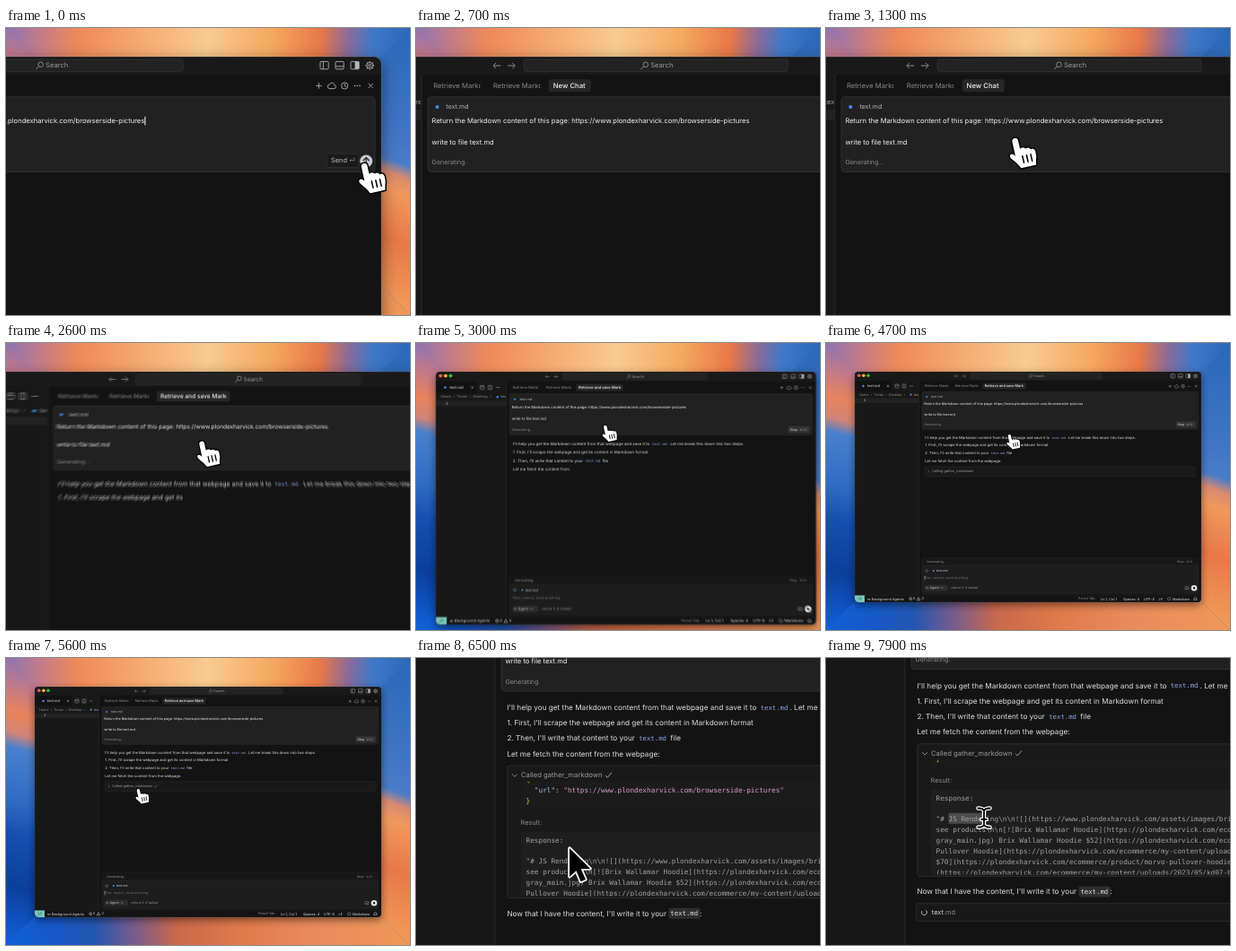
An HTML page with a canvas that plays this animation: 450x320 px, repeating every 8 s.

```html
<!DOCTYPE html>
<html lang="en">
<head>
<meta charset="utf-8">
<title>Chat panel demo</title>
<style>
html, body { margin: 0; width: 100%; height: 100%; overflow: hidden; background: #111; }
canvas { display: block; width: 450px; height: 320px; }
</style>
</head>
<body>
<canvas id="stage"></canvas>
<script>
const W = 450, H = 320, LOOP = 8000;
const cv = document.getElementById('stage');
const dpr = window.devicePixelRatio || 1;
cv.width = W * dpr;
cv.height = H * dpr;
const c = cv.getContext('2d');

const SANS = 'Inter, "DejaVu Sans", sans-serif';
const MONO = '"DejaVu Sans Mono", monospace';
const HOST = 'plondexharvick.com';
const PAGE = 'https://www.' + HOST + '/browserside-pictures';
const SHOP = 'https://' + HOST + '/ecommerce/';

const clamp = v => Math.max(0, Math.min(1, v));
const ease = (t, a, b) => { const p = clamp((t - a) / (b - a)); return p * p * (3 - 2 * p); };
const spring = (t, start, k) => {
  const u = Math.max(0, (t - start) / 1000 * k);
  return 1 - (1 + u) * Math.exp(-u);
};

// Text is set at 40px and scaled down, so advances stay fractional.
function text(str, x, y, size, color, opt = {}) {
  c.save();
  c.font = `${opt.weight || 400} 40px ${opt.mono ? MONO : SANS}`;
  c.textRendering = 'geometricPrecision';
  c.fillStyle = color;
  c.translate(x, y + size * 0.34);
  c.scale(size / 40, size / 40);
  c.fillText(str, 0, 0);
  const w = c.measureText(str).width * size / 40;
  c.restore();
  return w;
}
function box(x, y, w, h, r, fill, stroke, lw = 0.5) {
  c.beginPath();
  c.roundRect(x, y, w, h, r);
  if (fill) { c.fillStyle = fill; c.fill(); }
  if (stroke) { c.strokeStyle = stroke; c.lineWidth = lw; c.stroke(); }
}
function dot(x, y, r, fill) {
  c.beginPath();
  c.arc(x, y, r, 0, 7);
  c.fillStyle = fill;
  c.fill();
}
function ring(x, y, r, color, lw = 0.5, a = 0, b = 7) {
  c.beginPath();
  c.arc(x, y, r, a, b);
  c.strokeStyle = color;
  c.lineWidth = lw;
  c.stroke();
}
function line(pts, color, lw = 0.5) {
  c.beginPath();
  for (let i = 0; i < pts.length; i += 2) c.lineTo(pts[i], pts[i + 1]);
  c.strokeStyle = color;
  c.lineWidth = lw;
  c.stroke();
}
function clipTo(x, y, w, h, draw) {
  c.save();
  c.beginPath();
  c.rect(x, y, w, h);
  c.clip();
  draw();
  c.restore();
}

function camera(t) {
  if (t >= 5600) {
    const b = spring(t, 5600, 11);
    return { s: 1 + b, x: -119 * b, y: -155.5 * b };
  }
  if (t >= 2450) {
    const s = 2 - spring(t, 2450, 7.13);
    return { s, x: -197 * (1 - spring(t, 2450, 8)), y: 32 * (1 - s) };
  }
  return { s: 2, x: -418 + 221 * spring(t, 100, 10), y: -32 };
}

function side(pts, grad, stops) {
  const g = c.createLinearGradient(...grad);
  for (const [p, col] of stops) g.addColorStop(p, col);
  c.beginPath();
  for (let i = 0; i < pts.length; i += 2) c.lineTo(pts[i], pts[i + 1]);
  c.fillStyle = g;
  c.fill();
}
// The backdrop stays still while the window zooms over it.
function wallpaper() {
  c.save();
  c.setTransform(dpr, 0, 0, dpr, 0, 0);
  c.fillStyle = '#3f70b8';
  c.fillRect(0, 0, W, H);
  side([0, 0, 450, 0, 450, 45, 0, 45], [0, 0, 448, 30],
    [[0, '#8a74b4'], [0.08, '#c07a8c'], [0.18, '#ee8a58'], [0.35, '#f6ad72'], [0.5, '#f8cb90'],
     [0.66, '#f5a860'], [0.78, '#e87848'], [0.85, '#8a6a9a'], [0.91, '#3f78c8'], [1, '#2a68b8']]);
  side([0, 0, 36, 36, 36, 320, 0, 320], [20, 0, -60, 300],
    [[0, '#8a74b4'], [0.1, '#c0788c'], [0.2, '#e8845c'], [0.27, '#d08478'], [0.32, '#4a80cc'],
     [0.5, '#2f6cc4'], [0.62, '#1550b0'], [0.8, '#0c3f9c'], [1, '#1060d8']]);
  side([450, 0, 410, 40, 410, 280, 450, 320], [440, 0, 340, 270],
    [[0, '#2a68b8'], [0.35, '#3f74c4'], [0.49, '#4a7cc8'], [0.54, '#d88a70'], [0.6, '#f0985c'],
     [0.78, '#e87848'], [1.0, '#f09858']]);
  side([0, 320, 36, 284, 410, 280, 450, 320], [0, 320, 450, 300],
    [[0, '#1060d8'], [0.12, '#1558c8'], [0.22, '#2456b0'], [0.32, '#7a5c8c'], [0.42, '#c8684c'],
     [0.58, '#e07a4a'], [0.75, '#e88a5c'], [1, '#f09858']]);
  c.restore();
}

const caretOn = t => Math.floor(t / 530) % 2 === 0;
const generating = t => 'Generating' + '.'.repeat([3, 1, 2][Math.floor(t % 1200 / 400)]);

function titleBar() {
  c.fillStyle = '#191919';
  c.fillRect(32, 32, 386, 10);
  ['#ff5f57', '#febc2e', '#28c840'].forEach((col, i) => dot(36.8 + i * 5.1, 36.2, 1.8, col));
  const g = '#8a8a8a', icon = '#a0a0a0';
  line([147.6, 37, 143.4, 37], g);
  line([145, 35.4, 143.4, 37, 145, 38.6], g);
  line([151.4, 37, 155.6, 37], g);
  line([154, 35.4, 155.6, 37, 154, 38.6], g);
  box(160.5, 33.6, 147, 6.7, 1.4, '#222', '#333', 0.4);
  ring(228.3, 36.4, 1.4, g);
  line([227.3, 37.4, 225.6, 39], g);
  text('Search', 231, 36.9, 3.8, '#9a9a9a');
  for (let i = 0; i < 3; i++) {
    const x = 384 + i * 8.5;
    box(x, 34.7, 4.6, 4.2, 0.5, null, icon);
    c.fillStyle = '#b5b5b5';
    if (i === 0) line([x + 1.7, 34.7, x + 1.7, 38.9], icon);
    if (i === 1) line([x, 37.4, x + 4.6, 37.4], icon);
    if (i === 2) c.fillRect(x + 2.3, 34.7, 2.3, 4.2);
  }
  ring(411.6, 36.9, 1.7, icon);
  ring(411.6, 36.9, 0.7, icon);
  for (let a = 0; a < 6.2; a += Math.PI / 4) {
    const dx = Math.cos(a), dy = Math.sin(a);
    line([411.6 + dx * 1.7, 36.9 + dy * 1.7, 411.6 + dx * 2.4, 36.9 + dy * 2.4], icon, 0.7);
  }
}

function sidebar() {
  c.fillStyle = '#181818';
  c.fillRect(32, 42, 71.5, 239);
  c.fillStyle = '#121212';
  c.fillRect(32, 42, 41, 11.5);
  dot(41.5, 48, 1.2, '#4c8df0');
  text('text.md', 46, 48, 3.9, '#e8e8e8');
  line([67.8, 46.8, 70.2, 49.2], '#bbb');
  line([70.2, 46.8, 67.8, 49.2], '#bbb');
  box(77, 46, 4, 4, 0.5, null, '#999');
  line([77, 47.4, 81, 47.4], '#999');
  box(85, 46, 4, 4, 0.5, null, '#999');
  line([87, 46, 87, 50], '#999');
  line([93, 48, 97, 48], '#999');
  clipTo(32, 53, 71, 10, () => {
    text('Users  ›  Tovan  ›  Desktop  ›', 37, 57.4, 3.8, '#888');
    dot(94.6, 57.6, 1.1, '#4c8df0');
    text('text.md', 97.8, 57.4, 3.8, '#999');
  });
  c.fillStyle = '#222';
  c.fillRect(32, 61.4, 71.5, 5.6);
  text('1', 42, 64.2, 3.8, '#ccc', { mono: 1 });
  c.fillStyle = '#2a2a2a';
  c.fillRect(103.2, 42, 0.5, 239);
}

function tabs(t) {
  [110, 143.4].forEach(x => clipTo(x, 43, 26.2, 10, () =>
    text('Retrieve Markdown', x, 48, 3.85, '#8a8a8a')));
  const named = t > 2100;
  box(174.3, 44.6, named ? 48 : 23.6, 7, 1.2, '#262626');
  clipTo(174, 43, named ? 46 : 24, 10, () =>
    text(named ? 'Retrieve and save Markdown' : 'New Chat', 176.8, 48, 3.85, '#f2f2f2', { weight: 500 }));
  const g = '#a0a0a0';
  line([381.6, 48.2, 384.8, 48.2], g);
  line([383.2, 46.6, 383.2, 49.8], g);
  c.beginPath();
  c.arc(389.4, 48.6, 1.2, 1.57, 4.7);
  c.arc(390.6, 47.7, 1.2, 3.6, 6);
  c.arc(391.7, 48.8, 1, 4.7, 7.85);
  c.closePath();
  c.strokeStyle = g;
  c.lineWidth = 0.5;
  c.stroke();
  ring(397.6, 48.2, 1.8, g);
  line([397.6, 47, 397.6, 48.3, 398.6, 48.8], g);
  for (let i = -1; i < 2; i++) dot(404.6 + i * 1.4, 48.2, 0.4, g);
  line([410.8, 46.9, 413.4, 49.5], g);
  line([413.4, 46.9, 410.8, 49.5], g);
}

function message(t) {
  box(107, 54.4, 307.5, 41.8, 2, '#212121', '#303030');
  dot(112.2, 60, 1, '#4c8df0');
  text('text.md', 117.2, 60, 3.5, '#b8b8b8');
  const w = text('Return the Markdown content of this page: ' + PAGE, 109.2, 67.8, 3.8, '#f0f0f0');
  text('write to file text.md', 109.2, 79.6, 3.8, '#f0f0f0');
  if (t < 300) {
    if (caretOn(t)) line([109.5 + w, 65.4, 109.5 + w, 70.2], '#fff', 0.5);
    box(387.5, 86, 18, 7.8, 1.4, '#1a1a1a', '#333', 0.4);
    text('Send', 390, 89.8, 3.7, '#bbb');
    text('⏎', 400, 89.8, 3.6, '#888');
    dot(409.6, 90.2, 3.5, '#c9cad6');
    line([409.6, 92, 409.6, 88.4], '#222', 0.6);
    line([407.9, 90, 409.6, 88.2, 411.3, 90], '#222', 0.6);
  } else {
    text(generating(t), 109.2, 90.8, 3.55, '#8a8a8a');
    box(389.5, 87.2, 22.5, 7, 1.2, '#333');
    text('Stop', 391.5, 90.8, 3.5, '#ddd');
    text('⌘⌫', 401.3, 90.8, 3.3, '#888');
  }
}

const LINES = [
  "I'll help you get the Markdown content from that webpage and save it to `text.md`. Let me break this down into two steps:",
  "1. First, I'll scrape the webpage and get its content in Markdown format",
  "2. Then, I'll write that content to your `text.md` file",
  'Let me fetch the content from the webpage:'
];
function rich(str, x, y, limit, chip) {
  str.split('`').forEach((part, i) => {
    const s = part.slice(0, Math.max(0, limit));
    limit -= part.length;
    if (!s) return;
    if (i % 2) {
      if (chip) box(x, y - 3, 17.6, 6, 1, '#2e2e2e');
      x += 1 + text(s, x + 1, y, 3.65, chip ? '#e2e2e2' : '#8fa2ea', { mono: 1 }) + 1;
    } else {
      x += text(s, x, y, 4.1, '#dedede');
    }
  });
}
function reply(t) {
  let left = Math.floor((t - 1995) * 0.272);
  LINES.forEach((s, i) => {
    rich(s, 110.2, 105.3 + i * 8.62, left);
    left -= s.replace(/`/g, '').length;
  });
}

const CODE = [
  '"# JS Rendering\\n\\n![](https://www.' + HOST + '/assets/images/brix.svg)Menu of items to',
  'see products\\n\\n[![Brix Wallamar Hoodie](' + SHOP + 'my-content/uploads/kd01-',
  'gray_main.jpg) Brix Wallamar Hoodie $52](' + SHOP + 'product/brix-hoodie) [![Morvo',
  'Pullover Hoodie](' + SHOP + 'my-content/uploads/kd02-black_main.jpg) Morvo Hoodie',
  '$70](' + SHOP + 'product/morvo-pullover-hoodie) [![Hoodie]',
  '(' + SHOP + 'my-content/uploads/2023/05/kd07-black_main.jpg) Hoodie',
  '$69](' + SHOP + 'product/wool-hoodie) [![Light Hoodie]',
  '(' + SHOP + 'my-content/uploads/kd09-green_main.jpg) Hoodie'
];
function toolOutput(t) {
  const off = 18 - 18 * ease(t, 6150, 6480) - 11.4 * ease(t, 6800, 7420);
  const mono = { mono: 1 }, size = 3.85, x = 120.8;
  c.translate(0, off);
  text('Parameters:', 117.8, 135.2, 3.7, '#8c8c8c');
  box(117.8, 140.5, 291, 21.5, 1, '#1b1b1b');
  text('{', x, 145.3, size, '#e8c84a', mono);
  let w = text('  "url"', x, 151.3, size, '#9cc3ee', mono);
  w += text(': ', x + w, 151.3, size, '#ccc', mono);
  text('"' + PAGE + '"', x + w, 151.3, size, '#dc9ad2', mono);
  text('}', x, 157.3, size, '#e8c84a', mono);
  text('Result:', 117.8, 169.3, 3.7, '#8c8c8c');
  box(117.8, 174.6, 291, 80, 1, '#1e1e1e');
  text('Response:', x, 179.3, size, '#a2a2a2', mono);
  if (t > 7450) {
    const from = x + 3 * 2.318;
    c.fillStyle = '#4b4b4b';
    c.fillRect(from, 187.7, Math.max(0, pointer(t).x - from), 6);
  }
  CODE.forEach((s, i) => text(s, x, 190.8 + i * 6, size, '#a2a2a2', mono));
}
function tool(t) {
  if (t < 3200) return;
  const open = spring(t, 5700, 14), h = 11 + 62.8 * open;
  box(110.4, 137.8, 301.6, h, 1.4, '#191919', '#2c2c2c');
  const done = t > 5000;
  c.save();
  c.translate(114.5, 143.2);
  c.rotate(open * Math.PI / 2);
  line([-0.7, -1.4, 0.7, 0, -0.7, 1.4], '#8a8a8a');
  c.restore();
  const w = text((done ? 'Called' : 'Calling') + ' gather_markdown', 118, 143, 3.85, '#9c9c9c');
  if (done) line([119.8 + w, 143.2, 120.9 + w, 144.4, 123.2 + w, 141.6], '#9c9c9c');
  if (t > 5700) clipTo(111, 146.6, 300, h - 9.8, () => toolOutput(t));
  if (t > 6050) rich("Now that I have the content, I'll write it to your `text.md`:", 110.2, 220.2, 999, true);
  if (t > 6800) {
    box(109.8, 226.8, 302, 9.8, 1.2, '#181818', '#2c2c2c');
    const a = t / 160;
    ring(114.2, 231.7, 1.5, '#b5b5b5', 0.5, a, a + 4.6);
    const n = text('text', 118.4, 231.7, 3.7, '#d8d8d8');
    text('.md', 118.4 + n, 231.7, 3.7, '#8c8c8c');
  }
}

function composer(t) {
  c.fillStyle = '#131313';
  c.fillRect(104, 238.6, 314, 43);
  box(107, 239.6, 307.5, 39.6, 1.6, '#171717', '#2b2b2b', 0.4);
  text(generating(t), 112.2, 244, 3.55, '#9a9a9a');
  text('Stop', 391, 244, 3.5, '#888');
  text('⌘⌫', 401, 244, 3.3, '#666');
  box(107, 248, 307.5, 31.2, 1.6, '#1d1d1d', '#2e2e2e', 0.4);
  ring(112.2, 254, 1.4, '#888');
  dot(119.8, 254, 1, '#4c8df0');
  text('text.md', 122.8, 254, 3.6, '#d0d0d0');
  text('Plan, search, build anything', 110, 262, 3.7, '#6c6c6c');
  if (t > 3000 && caretOn(t)) line([110, 259.6, 110, 264.4], '#ddd', 0.5);
  box(109.6, 269.8, 26.4, 6.8, 3, '#2c2c2c');
  text('∞', 111, 273, 3.6, '#aaa');
  text('Agent', 115.6, 273, 3.6, '#d0d0d0');
  text('⌘I', 127.3, 273, 3, '#777');
  text('velora-2.4-ballad', 139, 273, 3.7, '#8c8c8c');
  box(400, 271.6, 4, 3, 0.5, null, '#999');
  line([400.3, 274.4, 401.6, 273, 402.4, 273.8, 403.6, 272.6], '#999', 0.4);
  dot(410, 273.2, 3.3, '#e6e6e6');
  c.fillStyle = '#222';
  c.fillRect(408.9, 272.1, 2.2, 2.2);
}

function statusBar() {
  c.fillStyle = '#141414';
  c.fillRect(32, 281, 386, 8);
  c.fillStyle = '#262626';
  c.fillRect(32, 281, 386, 0.4);
  c.fillStyle = '#7cc4bd';
  c.fillRect(32, 281.4, 11, 7.6);
  line([35.6, 284, 37.4, 285.4, 35.6, 286.8], '#153', 0.5);
  line([39.8, 283.4, 38, 284.8, 39.8, 286.2], '#153', 0.5);
  text('∞', 46, 285.2, 4, '#ddd');
  text('Background Agents', 51, 285.2, 3.85, '#ddd');
  ring(94.2, 285.2, 1.5, '#ddd');
  line([93.4, 284.4, 95, 286], '#ddd', 0.4);
  text('0', 97, 285.2, 3.8, '#ddd');
  line([101.2, 286.8, 103, 283.6, 104.8, 286.8, 101.2, 286.8], '#ddd');
  text('0', 106.4, 285.2, 3.8, '#ddd');
  text('Pencil Tab', 281, 285.2, 3.8, '#8a8a8a');
  [['Ln 1, Col 1', 306], ['Spaces: 4', 331], ['UTF-8', 354], ['LF', 370.6], ['Markdown', 386]]
    .forEach(([s, x]) => text(s, x, 285.2, 3.85, '#ddd'));
  box(380.6, 283.8, 3.2, 2.8, 0.8, null, '#ccc', 0.4);
  line([409.6, 286.4, 410.2, 284.2, 411.4, 283.4, 412.6, 284.2, 413.2, 286.4, 409.6, 286.4], '#ddd');
}

function scene(t) {
  wallpaper();
  const s = c.getTransform().a;
  c.save();
  c.shadowColor = 'rgba(0,0,0,.5)';
  c.shadowBlur = 9 * s;
  c.shadowOffsetY = 3 * s;
  box(32, 32, 386, 257, 4.4, '#131313');
  c.restore();
  c.save();
  c.beginPath();
  c.roundRect(32, 32, 386, 257, 4.4);
  c.clip();
  c.fillStyle = '#131313';
  c.fillRect(32, 32, 386, 257);
  titleBar();
  sidebar();
  clipTo(104, 53, 314, 186, () => {
    c.translate(0, -12.15 * ease(t, 6750, 7100));
    message(t);
    reply(t);
    tool(t);
  });
  tabs(t);
  composer(t);
  statusBar();
  c.restore();
  box(32, 32, 386, 257, 4.4, null, 'rgba(255,255,255,.16)', 0.4);
}

// start, end, x, y
const MOVES = [
  [450, 1250, 203.5, 77.5],
  [2650, 3500, 204, 102],
  [4700, 5400, 147, 146],
  [5750, 6350, 145, 183.8],
  [6750, 7350, 128, 166.8],
  [7450, 7880, 147.5, 166.8]
];
function pointer(t) {
  let x = 408.2, y = 91.5;
  for (const [a, b, nx, ny] of MOVES) {
    const p = ease(t, a, b);
    x += (nx - x) * p;
    y += (ny - y) * p;
  }
  return { x, y };
}
const HAND = new Path2D('M-1.8 1.8Q-1.8 0 0 0Q1.8 0 1.8 1.8L1.8 6.4Q4 5.4 5 7Q7 6.2 8 7.9Q10 7.3 10.4 9.4L10.3 12.4Q9.4 14.6 9.1 17L0 17Q-1.5 14-4.6 10.6Q-5.6 8.7-4.1 8.2Q-3 8-1.8 9.8Z');
const ARROW = new Path2D('M0 0L0 16L3.7 12.6L6.3 18.6L9 17.4L6.4 11.6L11.6 11.4Z');
const BEAM = new Path2D('M-3.3-5.3Q-.7-5.3 0-4Q.7-5.3 3.3-5.3M0-4L0 4M-3.3 5.3Q-.7 5.3 0 4Q.7 5.3 3.3 5.3M-1.4.9L1.4.9');
function cursor(t) {
  const p = pointer(t);
  c.save();
  c.translate(p.x, p.y);
  c.lineJoin = c.lineCap = 'round';
  const draw = (path, color, lw) => {
    c.strokeStyle = color;
    c.lineWidth = lw;
    c.stroke(path);
  };
  if (t < 5750) {
    c.rotate(-0.22);
    c.scale(0.94, 1);
    draw(HAND, '#000', 1.6);
    c.fillStyle = '#fff';
    c.fill(HAND);
    for (let i = 0; i < 3; i++) line([2.3 + i * 2.5, 10.6, 2.3 + i * 2.5, 14.4], '#000', 0.8);
  } else if (t < 7000) {
    draw(ARROW, '#fff', 1.7);
    c.fillStyle = '#000';
    c.fill(ARROW);
  } else {
    draw(BEAM, '#fff', 2.2);
    draw(BEAM, '#000', 0.9);
  }
  c.restore();
}

function aim(t) {
  const v = camera(t);
  c.setTransform(v.s * dpr, 0, 0, v.s * dpr, v.x * dpr, v.y * dpr);
}

const keep = document.createElement('canvas');
keep.width = cv.width;
keep.height = cv.height;
const kc = keep.getContext('2d');
kc.globalCompositeOperation = 'copy';

// A moving camera averages a few passes for motion blur.
function render(t) {
  const a = camera(t - 8), b = camera(t + 8);
  const speed = Math.abs(a.s - b.s) * 200 + Math.abs(a.x - b.x);
  const passes = speed > 3 ? 4 : 1;
  for (let i = 0; i < passes; i++) {
    if (i) kc.drawImage(cv, 0, 0);
    aim(t + (passes > 1 ? (i - 1.5) * 4 : 0));
    scene(t);
    if (i) {
      c.save();
      c.setTransform(1, 0, 0, 1, 0, 0);
      c.globalAlpha = i / (i + 1);
      c.drawImage(keep, 0, 0);
      c.restore();
    }
  }
  aim(t);
  cursor(t);
}

const began = performance.now();
function tick() {
  render((performance.now() - began) % LOOP);
  requestAnimationFrame(tick);
}
tick();
</script>
</body>
</html>
```
